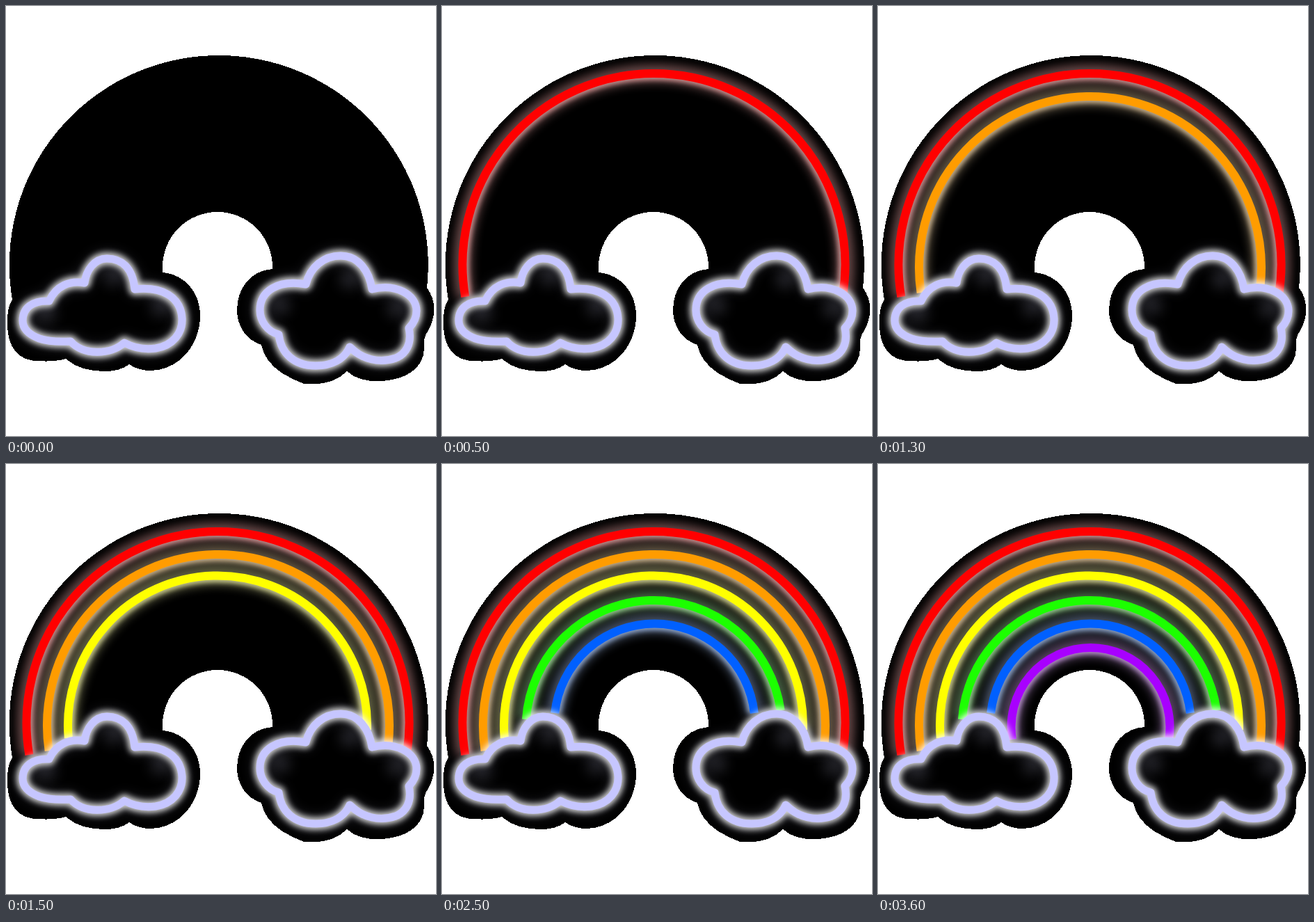
An HTML page for the animation above (4 s loop, 618 by 618 pixels).

```html
<!DOCTYPE html>
<html lang="en">
<head>
<meta charset="utf-8">
<title>Neon rainbow</title>
<style>
  html, body { margin: 0; width: 100%; height: 100%; overflow: hidden; background: #fff; }
  svg { display: block; width: 100%; height: 100%; }
</style>
</head>
<body>
<svg viewBox="0 0 618 618">
  <defs>
    <g id="filters"></g>
    <path id="board" d="M9 422C2 432 2 445 2 458C2 490 18 510 45 510C58 511 72 511 86 507
      C100 520 120 525 142 525C156 525 168 522 177 515C186 521 196 524 207 524
      C250 524 280 485 279 443C278 410 255 385 225 383V375A79 79 0 0 1 383 375V378
      C352 380 332 405 332 437C332 460 345 480 367 487C373 515 395 530 428 543
      C455 545 475 540 490 525C505 538 523 540 540 539C575 537 602 520 601 490
      C602 483 599 478 606 468C617 450 620 425 605 405A301 301 0 1 0 9 422Z"/>
    <clipPath id="clip"><use href="#board"/></clipPath>
  </defs>
  <use href="#board" fill="#000" shape-rendering="crispEdges"/>
  <g clip-path="url(#clip)">
    <g id="rings"></g>
    <g id="clouds"></g>
  </g>
</svg>
<script>
const $ = id => document.getElementById(id);

// colour, centre x, centre y, radius, y of left end, y of right end
const rings = [
  ['#f00', 304.5, 372, 275, 418, 416],
  ['#ff9c00', 305, 376, 246, 412, 402],
  ['#ff0', 304, 375.5, 215, 394, 382],
  ['#1cff00', 304.5, 380, 184, 367, 354],
  ['#0060ff', 305.5, 373.7, 144.2, 358, 358],
  ['#a800ff', 305.5, 378, 114, 396, 396],
];

const clouds = [
  `M62 424C72 402 92 394 113 398C115 380 127 363 145 363C165 363 182 375 185 407
   C225 403 251 418 253 449C254 470 240 488 215 492C200 494 185 492 170 484
   C150 502 110 502 93 482C75 483 60 482 48 478C32 472 24 463 24 452C24 434 38 423 62 424Z`,
  `M431 400C437 375 457 359 481 359C506 359 522 380 526 407C560 398 590 415 590 438
   C590 448 586 456 579 463C584 485 575 500 560 506C537 514 512 508 494 490
   C486 508 468 517 445 517C415 517 395 500 392 472C375 468 365 452 365 437
   C365 410 390 393 431 400Z`,
];

// soft patches of light inside the clouds: x, y
const patches = [[58, 442], [154, 388], [222, 432], [394, 430], [494, 392], [562, 434]];

const blurs = [3, 4, 7, 10];
$('filters').innerHTML = blurs.map(s =>
  `<filter id="b${s}" filterUnits="userSpaceOnUse" x="0" y="0" width="618" height="618"
    color-interpolation-filters="sRGB"><feGaussianBlur stdDeviation="${s}"/></filter>`).join('');

function line(d, colour, width, opacity = 1, blur = 0) {
  const filter = blur ? ` filter="url(#b${blur})"` : '';
  return `<path d="${d}" fill="none" stroke="${colour}" stroke-width="${width}"
    opacity="${opacity}" stroke-linejoin="round"${filter}/>`;
}

function arc(cx, cy, r, yl, yr) {
  const dx = y => Math.sqrt(r * r - (y - cy) ** 2);
  const large = +(yl + yr > 2 * cy);
  return `M${cx - dx(yl)} ${yl}A${r} ${r} 0 ${large} 1 ${cx + dx(yr)} ${yr}`;
}

$('rings').innerHTML = rings.map(([colour, cx, cy, r, yl, yr]) => {
  const tint = `color-mix(in srgb, ${colour} 30%, #fff)`;
  const d = arc(cx, cy, r, yl, yr);
  return '<g>' + line(d, tint, 26, 0.4, 7) +
    line(arc(cx, cy, r - 5, yl, yr), tint, 9, 0.65, 3) +
    line(d, colour, 12) + '</g>';
}).join('');

$('clouds').innerHTML =
  clouds.map(d => `<path d="${d}" opacity=".75"/>`).join('') +
  patches.map(([x, y]) =>
    `<circle cx="${x}" cy="${y}" r="13" fill="#c8c8e8" opacity=".22" filter="url(#b10)"/>`).join('') +
  clouds.map(d => line(d, '#dcdcff', 16, 0.2, 10) + line(d, '#fff', 17, 0.85, 4) +
    line(d, '#c6c6ff', 11)).join('');

const groups = [...$('rings').children];

function draw(now) {
  const lit = Math.floor(now % 4000 / 500);
  groups.forEach((g, i) => g.setAttribute('visibility', i < lit ? 'visible' : 'hidden'));
  requestAnimationFrame(draw);
}
draw(0);
</script>
</body>
</html>
```
